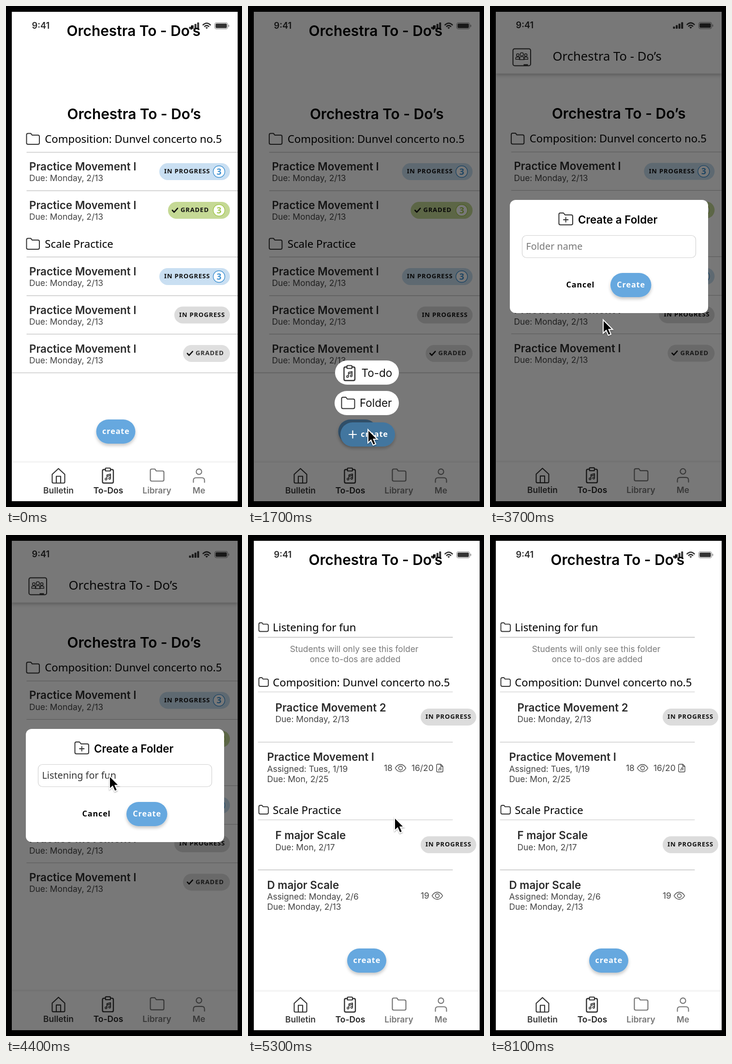
Recreate the animation shown at these times as an HTML page. Size 488 by 1036 pixels, loop 8.2 s.

```html
<!DOCTYPE html>
<html lang="en">
<head>
<meta charset="utf-8">
<title>Orchestra To-Dos</title>
<style>
html, body { margin: 0; width: 100%; height: 100%; overflow: hidden; background: #000; }
svg { display: block; }
text { font-family: Inter, Roboto, sans-serif; fill: #000; white-space: pre; }
.head { font-size: 29.8px; font-weight: 600; }
.item { font-size: 22.4px; font-weight: 600; fill: #2b2b2b; }
.note { font-size: 17.4px; fill: #444; }
.hint { font-size: 17.4px; fill: #7a7a7a; }
.tab { font-size: 17.4px; font-weight: 600; }
.clock { font-size: 18.2px; font-weight: 600; fill: #2b2b2b; }
.menu { font-size: 22.4px; fill: #111; }
.title { font-size: 22.4px; font-weight: 600; }
.folder, .bar, .field, .tag, .btn, .num { font-family: "Noto Sans", "Open Sans", sans-serif; }
.folder { font-size: 22.2px; }
.bar { font-size: 25.7px; fill: #111; }
.field { font-size: 19.8px; }
.tag { font-size: 13.1px; font-weight: 700; letter-spacing: .8px; }
.btn { font-size: 16.2px; font-weight: 800; letter-spacing: .9px; }
.num { font-size: 17.5px; font-weight: 700; }
.line { fill: none; stroke-linecap: round; stroke-linejoin: round; }
</style>
</head>
<body>
<svg id="stage" width="488" height="1036" viewBox="0 0 488 1036"></svg>
<script>
const LOOP = 8200, STEP = 100;
const BLUE = '#66a8df', INK = '#333', GRAY = '#777';

const text = (x, y, s, cls, more = '') => `<text x="${x}" y="${y}" class="${cls}" ${more}>${s}</text>`;
const mid = (x, y, s, cls, fill = '#000') => text(x, y, s, cls, `text-anchor="middle" style="fill:${fill}"`);
const box = (x, y, w, h, r, fill, more = '') =>
  `<rect x="${x}" y="${y}" width="${w}" height="${h}" rx="${r}" fill="${fill}" ${more}/>`;
const path = (d, color = INK, w = 2) => `<path class="line" d="${d}" stroke="${color}" stroke-width="${w}"/>`;
const rule = (y, x1 = 43, x2 = 479, color = '#c9c9c9') => path(`M${x1} ${y}H${x2}`, color, 1.3);
const move = (x, y, s) => `<g transform="translate(${x} ${y})">${s}</g>`;

// Icons
const folder = (x, y, w, h, color = INK, lw = 2) => move(x, y, path(
  `M3 0H${w * .33}L${w * .44} ${h * .16}H${w - 3}q3 0 3 3V${h - 3}q0 3 -3 3H3q-3 0 -3 -3V3q0 -3 3 -3z`, color, lw));
const notes = (x, y, k, color) => move(x, y, `<g transform="scale(${k})">` +
  path('M-3 5V-4L5 -6V3M-3 -1L5 -3', color, 1.8) +
  `<circle cx="-5" cy="5" r="2" class="line" stroke="${color}" stroke-width="1.6"/>` +
  `<circle cx="3" cy="3.4" r="2" class="line" stroke="${color}" stroke-width="1.6"/></g>`);
const clipboard = (x, y) => move(x, y,
  path('M-5 -12H-8q-3 0 -3 3V13q0 3 3 3H8.500q3 0 3 -3V-9q0 -3 -3 -3H5.500', INK, 2.4) +
  path('M-3.500 -15H4q1.500 0 1.500 1.500V-10.500q0 1.500 -1.500 1.500H-3.500q-1.500 0 -1.500 -1.500V-13.500q0 -1.500 1.500 -1.500z', INK, 2.2) +
  notes(1, 3, .95, INK));
const eye = (x, y) => move(x, y,
  path('M-11 0Q-6.500 -7.500 0 -7.500T11 0Q6.500 7.500 0 7.500T-11 0z', '#444', 1.4) +
  '<circle r="4" class="line" stroke="#444" stroke-width="1.4"/>');
const sheet = (x, y) => move(x, y,
  path('M2 0H8.500L13 4.500V14q0 2 -2 2H2q-2 0 -2 -2V2q0 -2 2 -2zM8.500 0V4.500H13', '#444', 1.4) +
  notes(6.8, 9.5, .48, '#444'));
const check = (x, y) => path(`M${x} ${y}l3.600 3.800l7.200 -8`, '#111', 2.6);

// Shared pieces
const status = () => text(53.5, 47, '9:41', 'clock') +
  [0, 1, 2, 3].map(i => box(378.5 + i * 5.6, 43 - i * 3, 4, 4.5 + i * 3, 1, INK)).join('') +
  path('M407.500 39Q415 32 422.500 39', INK, 2.6) + path('M410.700 42.300Q415 38.500 419.300 42.300', INK, 2.5) +
  `<path d="M412.300 44.600Q415 42.700 417.700 44.600L415 47.500z" fill="${INK}"/>` +
  box(431.5, 34.5, 27, 13, 3.8, 'none', 'stroke="#888" stroke-width="1.1"') +
  box(433.3, 36.3, 23.4, 9.4, 2, INK) + box(459.8, 38.8, 1.6, 4.6, .8, '#888');

const nav = () => box(12, 944, 467, 82, 0, '#fff', 'filter="url(#up)"') +
  path('M95.500 968.500L108.500 956.500L121.500 968.500V984q0 2.500 -2.500 2.500H98q-2.500 0 -2.500 -2.500zM104 986.500V972.500H113V986.500', INK, 2.1) +
  clipboard(210.5, 970.5) + folder(298.5, 957.5, 28, 25, GRAY, 2.2) +
  `<circle cx="399" cy="963" r="5.600" class="line" stroke="${GRAY}" stroke-width="2.1"/>` +
  path('M387.500 985V981q0 -5.500 5.500 -5.500H405q5.500 0 5.500 5.500V985', GRAY, 2.1) +
  mid(108.5, 1007.5, 'Bulletin', 'tab', '#3a3a3a') + mid(211.5, 1007.5, 'To-Dos', 'tab', '#222') +
  mid(312, 1007.5, 'Library', 'tab', GRAY) + mid(399, 1007.5, 'Me', 'tab', GRAY);

const button = (x, y, w, s, fill = BLUE) => box(x, y, w, 50, 25, fill, 'filter="url(#drop)"') +
  mid(x + w / 2 + .4, y + 30, s, 'btn', '#fff');

const tag = (x, y, s, fill, opt = {}) => {
  const right = 463, color = opt.color || '#111';
  let out = box(x, y, (opt.right || right) - x, 35, 17.5, fill);
  if (opt.check) out += check(x + 9, y + 17.5);
  out += text(x + (opt.check ? 26 : 10), y + 21.2, s, 'tag', `style="fill:${color}"`);
  if (opt.ring) out += `<circle cx="440.500" cy="${y + 17.5}" r="12" fill="#fff" stroke="${opt.ring}" stroke-width="1.400"/>` +
    mid(440.5, y + 23.8, '3', 'num', opt.ring);
  return out;
};
const entry = (x, y, name, ...info) => text(x, y, name, 'item') +
  info.map((s, i) => text(x, y + 22.2 + i * 21.5, s, 'note')).join('');
const row = y => entry(48, y, 'Practice Movement I', 'Due: Monday, 2/13');
const PIECE = 'Composition: Dunvel concerto no.5';

const list = () => text(126.5, 234, 'Orchestra To - Do’s', 'head') +
  folder(42.5, 263.5, 26.5, 22.5) + text(80.3, 283, PIECE, 'folder') +
  rule(302.5) + row(340) + tag(317, 325, 'IN PROGRESS', '#c9dff2', { ring: '#3f92d2' }) +
  rule(382) + row(419.8) + tag(335, 405, 'GRADED', '#c5d995', { check: 1, ring: '#a3c74f' }) +
  folder(42.5, 480.5, 26.5, 22.5) + text(80.3, 499.8, 'Scale Practice', 'folder') +
  rule(519) + row(557) + tag(317, 542, 'IN PROGRESS', '#c9dff2', { ring: '#3f92d2' }) +
  rule(599) + row(637) + tag(348, 621.5, 'IN PROGRESS', '#dcdcdc') +
  rule(678.5) + row(716.8) + tag(366, 701, 'GRADED', '#dfdfdf', { check: 1, color: '#333' });

const bigTitle = () => text(125.5, 62, 'Orchestra To - Do’s', 'head');
const paper = box(12, 12, 467, 1012, 0, '#fff');
const dim = box(12, 12, 467, 1012, 0, '#000', 'opacity=".53"');

const home = dx => paper + status() + bigTitle() + move(dx, 0, list()) +
  rule(758.5, 12) + button(186.5, 855, 81, 'create') + nav();

const menu = () => home(1.4) + dim +
  box(180, 733, 132, 50, 25, '#fff') + clipboard(209.5, 758.5) + text(234.5, 766.5, 'To-do', 'menu') +
  box(179, 796, 133, 50, 25, '#fff') + folder(193.5, 809, 27, 23.5) + text(231, 829, 'Folder', 'menu') +
  box(191, 861, 113, 50, 25, '#42769f', 'filter="url(#drop)"') +
  path('M209 886H224M216.500 878.500V893.500', '#fff', 2.2) + mid(261.5, 891, 'create', 'btn', '#fff');

const person = (x, y, r) => `<circle cx="${x}" cy="${y}" r="${r}" class="line" stroke="${INK}" stroke-width="1.500"/>` +
  path(`M${x - r * 1.6} ${y + r * 3.3}V${y + r * 2.5}q0 ${-r} ${r} ${-r}H${x + r * .6}q${r} 0 ${r} ${r}V${y + r * 3.3}z`, INK, 1.4);
const header = () => box(12, 12, 467, 128, 0, '#fff', 'filter="url(#drop)"') +
  box(47.5, 89, 36.5, 35, 3.5, 'none', `stroke="${INK}" stroke-width="2"`) + box(69.5, 121, 9, 3.5, 0, INK) +
  person(57.5, 102, 2.7) + person(74, 102, 2.7) + person(65.8, 100.5, 3.3) +
  text(129.5, 114, 'Orchestra To - Do’s', 'bar');

const modal = (dx, value, color) => paper +
  move(0, -.6, header() + status() + move(dx, 0, list()) + nav()) + dim +
  box(41, 401, 410, 234, 12, '#fff') +
  folder(142.5, 428, 28.5, 24.5) + path('M152 442H161.500M156.750 437.200V446.800', INK, 1.9) +
  text(182, 450, 'Create a Folder', 'title') +
  box(66.5, 474.5, 359, 46, 9, '#fff', 'stroke="#d2d2d2" stroke-width="1.200"') +
  text(74.5, 503.5, value, 'field', `style="fill:${color}"`) +
  text(157.5, 582, 'Cancel', 'btn') + button(249, 552, 84.5, 'Create');

const group = (y, s) => folder(22.5, y - 9.5, 19.5, 18, INK, 1.9) + text(51.3, y + 8.2, s, 'folder');
const views = (x, y, n) => text(x, y + 6.3, n, 'note') + eye(x + 34.5, y);
const shortRule = (y, color) => rule(y, 21, 423, color);

const done = () => paper + status() + bigTitle() +
  group(191, 'Listening for fun') + shortRule(211.5, '#bdbdbd') +
  mid(219.5, 242, 'Students will only see this folder', 'hint', '#7a7a7a') +
  mid(221.5, 263, 'once to-dos are added', 'hint', '#7a7a7a') +
  group(304.5, PIECE) + shortRule(324.5, '#d8d8d8') +
  entry(56.5, 365, 'Practice Movement 2', 'Due: Monday, 2/13') +
  tag(357, 359, 'IN PROGRESS', '#dcdcdc', { right: 472 }) + shortRule(428.3, '#c4c4c4') +
  entry(39.5, 467.3, 'Practice Movement I', 'Assigned: Tues, 1/19', 'Due: Mon, 2/25') +
  views(281, 482, '18') + text(338, 488.3, '16/20', 'note') + sheet(390, 474) +
  group(568.5, 'Scale Practice') + shortRule(589, '#d8d8d8') +
  entry(56.5, 629.3, 'F major Scale', 'Due: Mon, 2/17') +
  tag(357, 623, 'IN PROGRESS', '#dcdcdc', { right: 472 }) + shortRule(692.5, '#c4c4c4') +
  entry(39.5, 731.5, 'D major Scale', 'Assigned: Monday, 2/6', 'Due: Monday, 2/13') +
  views(357, 746, '19') + button(205, 855, 81, 'create') + nav();

// Each screen with the time it appears
const screens = [
  [0, home(0)], [1700, menu()], [3500, modal(1.4, 'Folder name', GRAY)],
  [4200, modal(0, 'Listening for fun', INK)], [5300, done()]
];

// Pointer: time, x, y
const track = [
  [500, 61, 940], [800, 170, 905], [1200, 247, 876], [1700, 247, 875], [2000, 247, 875],
  [2600, 255, 822], [3400, 250, 820], [3500, 249, 812], [3600, 244, 750], [3700, 233, 648],
  [3800, 222, 555], [3900, 215, 505], [4400, 213, 497], [5000, 302, 583], [5500, 302, 583],
  [6000, 352, 330], [6300, 372, 230], [6500, 86, 217], [6600, 41, 205], [6900, 41, 205]
];
const handTimes = [[1200, 1700], [2300, 3500]];

const shadow = (id, dy, blur, a) => `<filter id="${id}" x="-20%" y="-40%" width="140%" height="180%">` +
  `<feDropShadow dx="0" dy="${dy}" stdDeviation="${blur}" flood-opacity="${a}"/></filter>`;
const stage = document.getElementById('stage');
stage.innerHTML = `<defs>${shadow('drop', 4, 3, .22)}${shadow('up', -1, 2, .1)}${shadow('soft', 1.5, 1.2, .35)}
  <clipPath id="phone"><rect x="12" y="12" width="467" height="1012"/></clipPath></defs>
  <rect width="488" height="1036"/>
  <g clip-path="url(#phone)">${screens.map(s => `<g class="screen">${s[1]}</g>`).join('')}</g>
  <g id="pointer"><path id="arrow" filter="url(#soft)" fill="#000" stroke="#fff" stroke-width="2"
    d="M1 1V28.500L7.300 22.700L11.800 33L17 30.700L12.600 20.700H20.500z"/>
  <g id="hand" transform="translate(-9 2)" filter="url(#soft)"><path fill="#fff" stroke="#000" stroke-width="2" stroke-linejoin="round"
    d="M5 3C8 1 10 3 11 6L13.500 12C14 9.500 17 9.500 18 12C19 10.500 21.500 10.500 22.500 13C24 11.500 27 12.500 27.500 16C28.500 21 28 24 26 28V32H13L12.500 29C9 26 5 23 2 19C0 16 3 14.500 5.500 16L8 18.500L4 8C3 5.500 3 4 5 3z"/>
  <path class="line" stroke="#000" stroke-width="1.700" d="M14.500 20V27M18.500 20V27M22.500 20V27"/></g></g>`;

const layers = [...stage.querySelectorAll('.screen')];
const [pointer, arrow, hand] = ['pointer', 'arrow', 'hand'].map(id => document.getElementById(id));
const show = (el, on) => el.setAttribute('display', on ? 'inline' : 'none');

function place(t) {
  const i = track.findIndex(k => k[0] > t);
  show(pointer, i > 0);
  if (i < 1) return;
  const [t0, x0, y0] = track[i - 1], [t1, x1, y1] = track[i];
  const p = (t - t0) / (t1 - t0);
  pointer.setAttribute('transform', `translate(${x0 + (x1 - x0) * p} ${y0 + (y1 - y0) * p})`);
  const isHand = handTimes.some(([a, b]) => t >= a && t < b);
  show(hand, isHand);
  show(arrow, !isHand);
}

function draw() {
  const t = Math.floor(performance.now() % LOOP / STEP) * STEP;
  const now = screens.filter(s => s[0] <= t).length - 1;
  layers.forEach((el, i) => show(el, i === now));
  place(t);
  requestAnimationFrame(draw);
}
draw();
</script>
</body>
</html>
```
